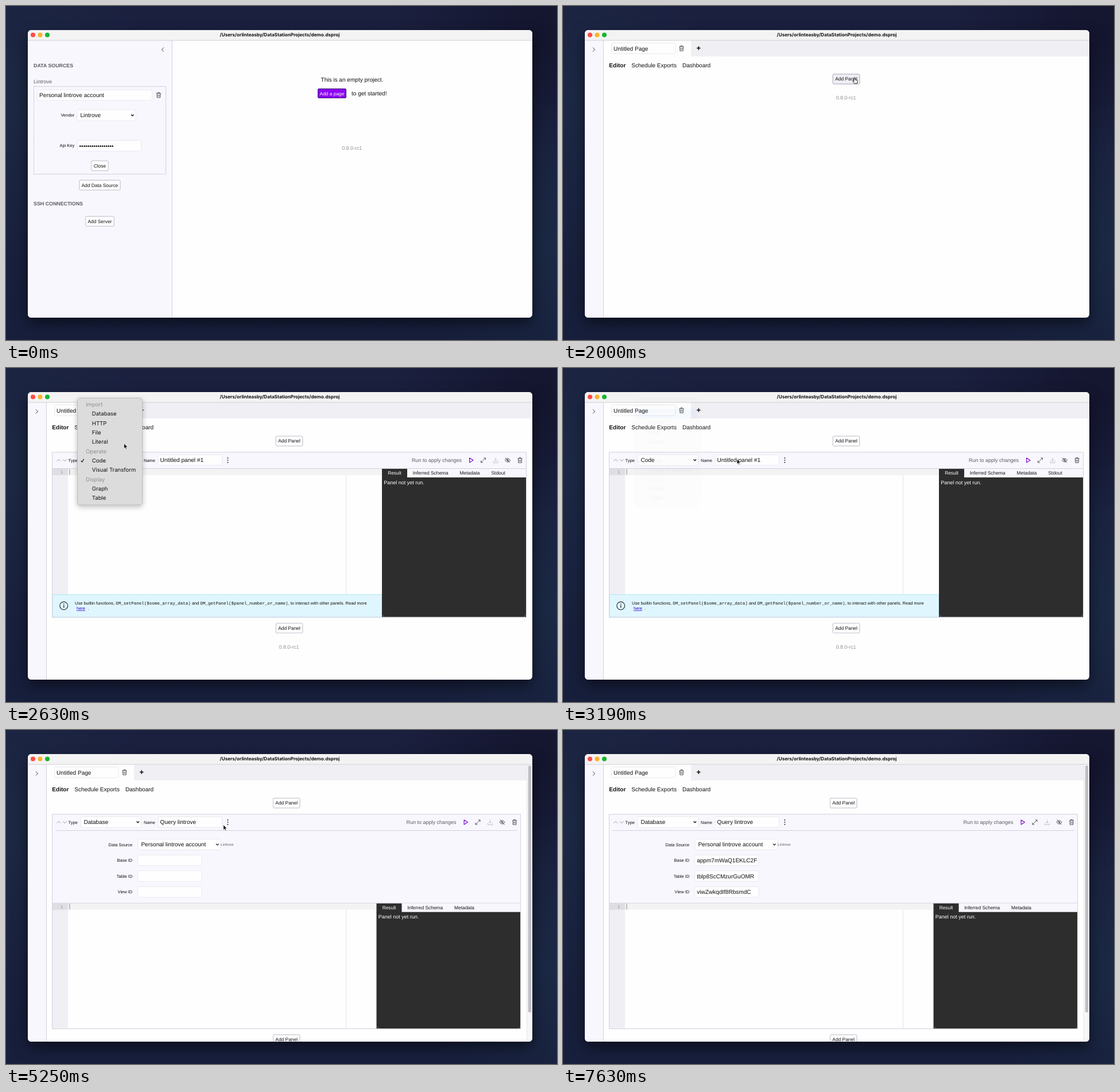
Animation, 960 px wide and 583 px high, one loop 8.06 s. Source, as an HTML page:

```html
<!DOCTYPE html>
<html lang="en">
<head>
<meta charset="utf-8">
<title>Project demo</title>
<style>
  html, body { margin: 0; width: 100%; height: 100%; overflow: hidden; }
  body {
    background:
      radial-gradient(ellipse 260px 300px at 0 28%, #1c2945, transparent),
      radial-gradient(ellipse 240px 260px at 100% 72%, #1b2945, transparent),
      radial-gradient(ellipse 260px 220px at 97% 8%, #14152e, transparent),
      linear-gradient(#1b203f, #171f3c);
  }
  svg { display: block; width: 960px; height: 583px; }
  text {
    font-family: "Liberation Sans", Arial, sans-serif;
    text-rendering: geometricPrecision;
    fill: #111;
  }
  .bold { font-weight: 700; }
  .mono { font-family: "Liberation Mono", monospace; }
  .ui { font-family: Inter, "Noto Sans", sans-serif; }
  .end { text-anchor: end; }
  .mid { text-anchor: middle; }
  .gray { fill: #919195; }
  .dim { fill: #5d5c63; }
  .light { fill: #fff; }
  .link { fill: #2a00d0; text-decoration: underline; }
  .frame { filter: drop-shadow(0 10px 12px rgba(0, 0, 0, .5)); }
  .button { fill: #fefefe; stroke: #c6c4d2; filter: drop-shadow(0 .5px .5px rgba(0, 0, 0, .2)); }
  .focus { fill: #fefefe; stroke: #e0dfe8; filter: drop-shadow(0 0 2px rgba(60, 50, 110, .3)); }
  .popup { filter: drop-shadow(0 3px 5px rgba(0, 0, 0, .25)); }
</style>
</head>
<body>
<svg id="stage" viewBox="0 0 960 583"></svg>
<script>
const LOOP = 8060, STEP = 62.5;
const PALE = '#f8f7fd', LINE = '#d3d1de', WHITE = '#fefefe';

// Moments of the story, in ms
const at = {
  collapse: 500, page: 1312, panel: 2125, menu: 2500, pick: 2900, database: 3250,
  select: 3500, type: 3970, form: 5187, base: 6250, table: 6625, view: 6750, blur: 6812
};

const text = (x, y, size, s, cls = '') =>
  `<text x="${x}" y="${y}" font-size="${size}" class="${cls}">${s}</text>`;
const box = (x, y, w, h, fill, more = '') =>
  `<rect x="${x}" y="${y}" width="${w}" height="${h}" fill="${fill}" ${more}/>`;
const path = (d, stroke = '#3c3c42', more = '') =>
  `<path d="${d}" fill="none" stroke="${stroke}" ${more}/>`;
const move = (x, y, s) => `<g transform="translate(${x} ${y})">${s}</g>`;
const during = (from, to, s) => `<g data-from="${from}" data-to="${to}">${s}</g>`;

const icon = (x, y, d, color = '#45444a') =>
  move(x, y, path(d, color, 'stroke-width=".9" stroke-linejoin="round"'));
const TRASH = 'M-4-3h8M-1.5-3v-1.5h3v1.5M-3.1-3l.4 7.3h5.4l.4-7.3M-1.1-1v3.6M1.1-1v3.6';
const trash = (x, y) => icon(x, y, TRASH);

const field = (x, y, w, value = '') =>
  box(x, y, w, 18.5, WHITE, 'stroke="#e9e8f0" rx="2"') + text(x + 3.6, y + 13, 10.05, value);
const select = (x, y, w, value) =>
  box(x, y, w, 19, WHITE, 'stroke="#e9e8f0" rx="2"') + text(x + 5.4, y + 13.1, 10.05, value) +
  path(`M${x + w - 8} ${y + 8.3}l2.3 2.3 2.3-2.3`, '#111', 'stroke-width="1.3"');
const focus = (x, y, w) => `<rect x="${x}" y="${y}" width="${w}" height="18.5" rx="2" class="focus"/>`;
const button = (cx, y, w, label) =>
  `<rect x="${cx - w / 2}" y="${y}" width="${w}" height="17" rx="1.5" class="button"/>` +
  text(cx, y + 11.4, 8.4, label, 'mid');
const version = (x, y) => text(x, y, 8.9, '0.8.0-rc1', 'mid gray');

const sidebar = () =>
  box(38, 60, 251, 484, PALE) + path('M289.5 60v484', LINE) +
  path('M274.8 72.5l-3.5 3.5 3.5 3.5') +
  text(48, 107.4, 8.85, 'DATA SOURCES', 'bold dim') +
  text(48, 135, 9, 'Lintrove', 'dim') +
  box(48.5, 140.5, 230, 153, PALE, 'stroke="#bcb9d2" stroke-dasharray="1 .6"') +
  field(54.5, 146.3, 200, 'Personal lintrove account') + trash(266, 155.5) +
  text(119.3, 193, 7.5, 'Vendor', 'end') + select(124, 181.2, 102, 'Lintrove') +
  text(119.3, 246.3, 7.5, 'Api Key', 'end') + field(124, 234.6, 111.5, '•'.repeat(17)) +
  button(163.4, 270.3, 29.5, 'Close') +
  button(163.4, 304.2, 71, 'Add Data Source') +
  text(48, 347.7, 8.85, 'SSH CONNECTIONS', 'bold dim') +
  button(163.4, 367.3, 49.5, 'Add Server');

const rail = () =>
  box(38, 60, 32, 484, PALE) + path('M70.5 60v484', LINE) + path('M52 72.5l3.5 3.5-3.5 3.5');

const welcome = () =>
  text(603, 131.6, 10.05, 'This is an empty project.', 'mid') +
  box(543.5, 144.5, 49, 16, '#8c05f2', 'stroke="#38186a" rx="1.5"') +
  text(568, 155.5, 8.4, 'Add a page', 'mid light') +
  text(602, 155.6, 10.05, 'to get started!') +
  version(602.7, 250.6);

const page = () =>
  box(71, 60, 846, 28, '#f0eff4') + box(71, 60, 152, 28, WHITE) +
  field(84.5, 64.6, 111.5, 'Untitled Page') + trash(206.5, 74) +
  path('M233 73.5h6.6M236.3 70.2v6.6', '#111', 'stroke-width="1.6"') +
  text(80.3, 106.7, 10.05, 'Editor', 'bold') +
  text(119.2, 106.7, 10.05, 'Schedule Exports') +
  text(208, 106.7, 10.05, 'Dashboard');

const addPanel = (x, y) => button(x, y, 46.5, 'Add Panel');

const header = (type, name) =>
  path('M88.5 162.7l3.3-3.3 3.3 3.3M99 159.4l3.3 3.3 3.3-3.3', '#8b8a92', 'stroke-width=".9"') +
  text(108.6, 163.8, 7.5, 'Type') + select(130, 151.2, 105.5, type) +
  text(240, 163.8, 7.5, 'Name') + field(265, 151.4, 111.5, name) +
  [157.2, 161, 164.8].map(y => `<circle cx="386.4" cy="${y}" r="1.1" fill="#444"/>`).join('');

const actions = () =>
  text(707, 164.4, 9, 'Run to apply changes', 'dim') +
  path('M807.6 157l6.4 4-6.4 4z', '#7d10c8', 'stroke-width="1.2" stroke-linejoin="round"') +
  icon(831.5, 161, 'M-4 4l8-8M.8-4h3.2v3.2M-.8 4h-3.2v-3.2') +
  icon(853, 161, 'M0-4.4v6M-2.5-.9l2.5 2.5 2.5-2.5M-4 1.5v2.8h8v-2.8', '#bab9c0') +
  icon(874, 161, 'M-4.6 0q4.6-6.4 9.2 0q-4.6 6.4-9.2 0zM-1.4 0a1.4 1.4 0 102.8 0a1.4 1.4 0 10-2.8 0M-4-4.4l8 8.8') +
  trash(895.5, 161);

const editor = () =>
  box(81, 176, 575, 219, WHITE) + box(81, 176, 27, 219, '#f0eff4') +
  box(108, 176, 548, 11, '#f3f3f4') + box(81, 176, 27, 11, '#dedee3') +
  text(97, 184, 7.5, '1', 'mid gray') +
  path('M111 176.5v10', '#8a8a8a') + path('M592.5 187v208', '#e6e6ea');

const results = (height, tabs) =>
  box(655, 176, 251.5, 15, PALE) + box(655, 176, 44, 16, '#2d2d2d') +
  box(655, 191, 251.5, height, '#2d2d2d') +
  text(677, 186.3, 8.4, 'Result', 'mid light') +
  tabs.map(([x, label]) => text(x, 186.3, 8.4, label)).join('') +
  text(658.3, 202.6, 9, 'Panel not yet run.', 'light') +
  path(`M656 ${187 + height}l3 3M902.5 ${190 + height}l3-3`, '#888', 'stroke-width=".7"');

const TABS = [[708.8, 'Inferred Schema'], [790.6, 'Metadata']];

const hint = () =>
  box(81, 395.5, 574, 39.5, '#e0f6fe', 'stroke="#a9dff2" stroke-width=".8"') +
  `<circle cx="100.7" cy="415" r="6.9" fill="none" stroke="#2c3438" stroke-width="1.2"/>` +
  path('M100.7 413.8v4.6M100.7 411v1.5', '#2c3438', 'stroke-width="1.4"') +
  text(120, 413.3, 7.5, 'Use builtin functions, <tspan class="mono">DM_setPanel($some_array_data)</tspan> and ' +
    '<tspan class="mono">DM_getPanel($panel_number_or_name)</tspan>, to interact with other panels. Read more') +
  text(123, 422.3, 7.5, '<tspan class="link">here</tspan>&#160; .');

const outline = (w, h) => box(80.5, 147, w, h, 'none', `stroke="${LINE}"`);

const codePanel = () =>
  addPanel(493.5, 119) + box(80.5, 147, 826, 29, PALE) +
  path('M81 175.5h825', LINE) + header('Code', 'Untitled panel #1') + actions() +
  editor() + hint() + results(244, [...TABS, [845.5, 'Stdout']]) +
  outline(826, 288) + addPanel(493.5, 445.5) + version(493, 489.5);

const dbPanel = () =>
  addPanel(493.5, 119) + box(80.5, 147, 826, 29, PALE) +
  path('M81 175.5h825', LINE) + header('Database', '') + actions() +
  during(at.database, 5000, focus(265, 151.4, 111.5)) +
  during(at.select, at.type, box(268.4, 154.5, 75.5, 12.5, '#b4d6fd')) +
  `<text id="name" x="268.6" y="164.4" font-size="10.05"></text>` +
  box(0, 155.2, 1, 11, '#111', 'id="caret"') +
  editor() + results(204, TABS) +
  outline(826, 248) + addPanel(493.5, 405.5) + version(493, 449.5);

const idRow = (y, label, value, paste, from, to) =>
  text(220.3, y + 12, 7.5, label, 'end') + field(229.6, y, 111.5) +
  during(from, to, focus(229.6, y, 111.5)) +
  during(paste, LOOP, text(233.2, y + 13, 10.05, value));

const formPanel = () =>
  addPanel(488.7, 119) + box(80.5, 147, 816, 156, PALE) +
  path('M86 175.5h805', LINE) + header('Database', 'Query lintrove') + move(-9.5, 0, actions()) +
  text(220.3, 202.6, 7.5, 'Data Source', 'end') +
  select(230, 190.3, 144, 'Personal lintrove account') +
  text(374, 202.4, 6.3, 'Lintrove', 'dim') +
  idRow(218.2, 'Base ID', 'appm7mWaQ1EKLC2F', at.base, 5562, 6500) +
  idRow(245.8, 'Table ID', 'tblp8ScCMzurGuOMR', at.table, 6500, 6687) +
  idRow(273.4, 'View ID', 'viwZwkqdIf8RbsmdC', at.view, 6687, at.blur) +
  move(0, 126.7, editor()) + path('M81 302.2h816', LINE) +
  move(-9.5, 126.7, results(204, TABS)) +
  outline(816, 374.5) + addPanel(488.7, 532) +
  box(907.5, 60, 10, 484, '#f7f7f9') + path('M907.5 60v484', '#e7e7ea') +
  box(909.8, 62, 5.4, 431, '#bfbfc3', 'rx="2.7"');

const ITEMS = ['Import', 'Database', 'HTTP', 'File', 'Literal', 'Operate', 'Code',
  'Visual Transform', 'Display', 'Graph', 'Table'];
const HEADS = ['Import', 'Operate', 'Display'];
const ROW = 16.32;

const menu = () =>
  `<g id="menu"><rect x="124.5" y="52.5" width="113" height="186.5" rx="4.5" fill="#dcdcdc" stroke="#bdbdbd" class="popup"/>` +
  box(128, 0, 106, ROW, '#3f7ff5', 'rx="2.5" id="mark"') +
  ITEMS.map((label, i) => {
    const head = HEADS.includes(label);
    return text(head ? 139 : 149.8, 67 + i * ROW, 9.6, label, head ? 'ui gray' : 'ui item');
  }).join('') + path('M130.6 161.8l2 2.3 3.2-5.4', '#111', 'stroke-width="1.2"') + '</g>';

const titleBar = () =>
  box(38, 42, 879, 18, '#f4f3f4') + path('M38 60h879', '#cfced3') +
  ['#fd4d46', '#fdb129', '#17b630'].map((c, i) =>
    `<circle cx="${47 + i * 12.5}" cy="50.6" r="4" fill="${c}"/>`).join('') +
  text(477, 53.3, 8.1, '/Users/orlinteasby/DataStationProjects/demo.dsproj', 'ui bold mid');

const pointer = () => `<g id="pointer">
  <path id="arrow" d="M0 0v9.4l2.1-2 1.4 3.2 1.6-.7-1.4-3.1h2.9z" fill="#111" stroke="#fff" stroke-width=".8"/>
  <path id="hand" d="M-1 .6a1 1 0 012 0v3.2l3.4.9q.9.4.8 1.4l-.7 4h-5l-2.7-3.7q-.4-1.3 1-.9l1.2 1z" fill="#fff" stroke="#111" stroke-width=".9"/>
  <path id="beam" d="M-2-5q2 0 2 1.2v7.6q0 1.2-2 1.2M2-5q-2 0-2 1.2v7.6q0 1.2 2 1.2M-1 1h2" fill="none" stroke="#222"/></g>`;

const stage = document.getElementById('stage');
stage.innerHTML =
  '<clipPath id="window"><rect x="38" y="42" width="879" height="502" rx="6"/></clipPath>' +
  box(38, 42, 879, 502, WHITE, 'rx="6" class="frame"') +
  '<g clip-path="url(#window)">' +
  during(0, at.collapse, sidebar() + welcome()) +
  during(at.collapse, LOOP, rail()) +
  during(at.collapse, at.page, move(-109.8, 0, welcome())) +
  during(at.page, LOOP, page()) +
  during(at.page, at.panel, addPanel(493.5, 119) + version(493, 163)) +
  during(1750, at.panel, box(470.2, 119, 46.5, 17, '#efeef4', 'stroke="#b9b7c6" rx="1.5"') +
    text(493.5, 130.4, 8.4, 'Add Panel', 'mid')) +
  during(at.panel, at.database, codePanel()) +
  during(at.database, at.form, dbPanel()) +
  during(at.form, LOOP, formPanel()) +
  titleBar() + '</g>' + menu() + pointer();

const $ = id => document.getElementById(id);
const timed = [...stage.querySelectorAll('[data-from]')];
const items = [...stage.querySelectorAll('.ui.item, .ui.gray')];
const toggle = (el, on) => { el.style.display = on ? '' : 'none'; };

// Pointer stops: time, x, y
const stops = [
  [62, 330, 160], [400, 273, 74], [562, 273, 74], [1062, 462, 151], [1375, 462, 151],
  [1750, 508, 125], [2125, 508, 125], [2437, 190, 161], [2500, 190, 161], [2625, 205.5, 131.5],
  [2812, 192, 79], [2900, 192, 79], [3187, 303, 158.5], [3375, 302, 161], [4875, 302, 161],
  [5125, 386, 160], [5187, 386, 160], [5562, 288, 230], [6437, 288, 230], [6562, 288, 257],
  [6625, 288, 257], [6700, 288, 284], [6750, 288, 284], [6812, 510, 244], [7000, 510, 244],
  [7562, 848, 50]
];
// Pointer shape from each time on
const shapes = [
  [0, ''], [62, 'arrow'], [375, 'hand'], [562, 'arrow'], [1000, 'hand'], [1375, 'arrow'],
  [1750, 'hand'], [2187, 'arrow'], [3250, 'beam'], [at.type, ''], [4875, 'beam'],
  [5000, 'arrow'], [5500, 'beam'], [at.blur, 'arrow'], [7562, '']
];

function place(t) {
  const i = stops.findIndex(s => s[0] > t);
  if (i <= 0) return stops[i ? stops.length - 1 : 0].slice(1);
  const [t0, x0, y0] = stops[i - 1], [t1, x1, y1] = stops[i];
  const u = (t - t0) / (t1 - t0), k = u * u * (3 - 2 * u);
  return [x0 + (x1 - x0) * k, y0 + (y1 - y0) * k];
}

function drawMenu(t, y) {
  const open = t >= at.menu && t < at.database;
  toggle($('menu'), open);
  if (!open) return;
  $('menu').style.opacity = Math.min(1, (3200 - t) / (3200 - at.pick));
  const row = t > 2650 ? Math.min(4, Math.max(1, Math.floor((Math.min(y, 136) - 55.3) / ROW))) : -1;
  const hot = t < at.pick ? row : 1;
  toggle($('mark'), hot > 0);
  $('mark').setAttribute('y', 55.3 + hot * ROW);
  items.forEach((el, i) => { el.style.fill = i === hot ? '#fff' : ''; });
}

function drawName(t) {
  const typing = t >= at.type;
  const count = Math.max(0, Math.floor((t - at.type) / 50));
  $('name').textContent = typing ? 'Query lintrove'.slice(0, count) : 'Untitled panel #1';
  toggle($('caret'), typing);
  if (typing && t < at.form) $('caret').setAttribute('x', 268.6 + $('name').getComputedTextLength());
}

function draw(now) {
  const time = Math.max(0, now - start) % LOOP;
  const t = Math.floor((time + 3) / STEP) * STEP;
  for (const el of timed) toggle(el, t >= el.dataset.from && t < el.dataset.to);
  const [x, y] = place(t);
  drawMenu(t, y);
  drawName(t);
  const shape = shapes.filter(s => s[0] <= t).pop()[1];
  for (const id of ['arrow', 'hand', 'beam']) toggle($(id), id === shape);
  $('pointer').setAttribute('transform', `translate(${x} ${y})`);
  requestAnimationFrame(draw);
}

const start = performance.now();
draw(start);
</script>
</body>
</html>
```
